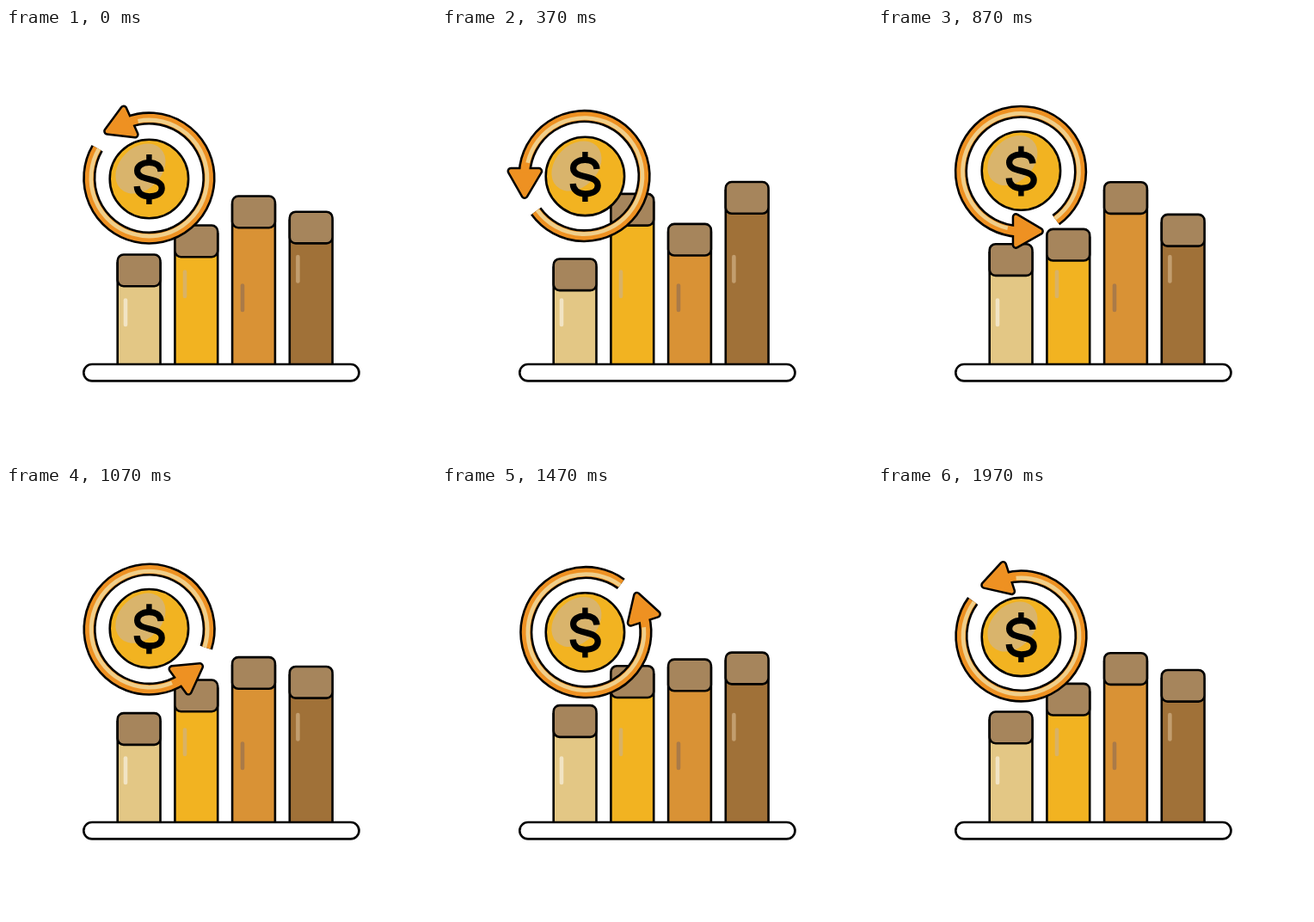
These frames come from a looping animation (500 px wide and 500 px high, 2000 ms). An HTML page:

```html
<!DOCTYPE html>
<html lang="en">
<head>
<meta charset="utf-8">
<title>Growing bars and a circling coin</title>
<style>
  html, body { margin: 0; width: 100%; height: 100%; overflow: hidden; background: #fff; }
  svg { display: block; width: 100%; height: 100%; }
</style>
</head>
<body>
<svg id="stage" viewBox="0 0 500 500" fill="none"></svg>
<script>
const LOOP = 2000, FRAMES = 60, BASE_Y = 391, BAR_WIDTH = 49.8;
const INK = '#000', ORANGE = '#ee9122', CREAM = '#f0cf8b';
const COIN_X = 166.4;

// tops: bar height keys at 0, 1/3 and 2/3 of a one-second cycle
const BARS = [
  { x: 129.7, fill: '#e3c785', shine: '#f1e4c4', shineX: 139, shineY: 316.5, tops: [263.5, 269.6, 228.5] },
  { x: 196.4, fill: '#f2b321', shine: '#d9b265', shineX: 208, shineY: 283.5, tops: [229.5, 191.5, 241.9] },
  { x: 263.1, fill: '#d99235', shine: '#aa7a48', shineX: 275, shineY: 299.5, tops: [195.5, 230.1, 149.2] },
  { x: 329.8, fill: '#a07138', shine: '#c29e6f', shineX: 339.4, shineY: 266, tops: [213.7, 177.8, 222.8] }
];

const stage = document.getElementById('stage');

function add(parent, tag, attrs) {
  const node = document.createElementNS('http://www.w3.org/2000/svg', tag);
  for (const name in attrs) node.setAttribute(name, attrs[name]);
  return parent.appendChild(node);
}

function arc(r, from, to) {
  const point = deg => {
    const a = deg * Math.PI / 180;
    return (r * Math.cos(a) - 0.9).toFixed(2) + ' ' + (r * Math.sin(a) - 0.4).toFixed(2);
  };
  return `M${point(from)}A${r} ${r} 0 1 1 ${point(to)}`;
}

const outline = { stroke: INK, 'stroke-width': 2.6 };

for (const bar of BARS) {
  bar.body = add(stage, 'path', { fill: bar.fill, ...outline });
  bar.cap = add(stage, 'rect', { x: bar.x, width: BAR_WIDTH, height: 36.7, rx: 7, fill: '#a6855c', ...outline });
  add(stage, 'path', {
    d: `M${bar.shineX} ${bar.shineY}v28.5`, stroke: bar.shine, 'stroke-width': 4.6, 'stroke-linecap': 'round'
  });
}
add(stage, 'rect', { x: 90.3, y: BASE_Y, width: 320.2, height: 19.4, rx: 9.7, fill: '#fff', ...outline });

// Ring and arrowhead, drawn around the coin centre with the arrow pointing down
const ring = add(stage, 'g');
const head = 'M-86.2 -6H-53.8L-70.4 21.8Z';
for (const [color, band, edge] of [[INK, 15.2, 9.4], [ORANGE, 10, 4.4]]) {
  add(ring, 'path', { d: arc(69.6, 183, 504), stroke: color, 'stroke-width': band });
  add(ring, 'path', { d: head, fill: color, stroke: color, 'stroke-width': edge, 'stroke-linejoin': 'round' });
}
add(ring, 'path', { d: arc(67.6, 193, 504), stroke: CREAM, 'stroke-width': 4.6 });

const coin = add(stage, 'g');
add(coin, 'circle', { r: 45.7, fill: '#f2b321', ...outline });
add(coin, 'ellipse', { rx: 33, ry: 24.5, transform: 'translate(-10 -12) rotate(-45)', fill: '#d9b46c' });
add(coin, 'path', {
  d: 'M13.6 -8.5C13.2 -15.5 8 -19 0 -19C-8.5 -19 -13.8 -15 -13.8 -9.5C-13.8 -3.5 -8 -1.8 0 .3' +
     'C9 2.5 14.8 4.5 14.8 10.8C14.8 16.8 9 20.3 .3 20.3C-8.5 20.3 -13.8 16 -14.2 8.5',
  stroke: INK, 'stroke-width': 7.2
});
add(coin, 'path', { d: 'M0 -28.5V-19M0 20V29.5', stroke: INK, 'stroke-width': 6.4 });

const ease = u => u * u * (3 - 2 * u);
const mix = (a, b, u) => a + (b - a) * ease(u);

function draw(time) {
  // 30 steps a second, held on a 10 ms grid
  const tick = Math.floor((time % LOOP) / 10);
  const t = Math.floor((tick + 0.5) * 0.3) * LOOP / FRAMES;

  const phase = (t % 1000) / 1000 * 3;
  const key = Math.min(2, Math.floor(phase + 1e-6));
  for (const bar of BARS) {
    const top = mix(bar.tops[key], bar.tops[(key + 1) % 3], phase - key);
    bar.cap.setAttribute('y', top);
    bar.body.setAttribute('d', `M${bar.x} ${BASE_Y}V${top + 10}h${BAR_WIDTH}V${BASE_Y}`);
  }

  const y = mix(175.5, 165.5, t < 1000 ? t / 1000 : 2 - t / 1000);
  coin.setAttribute('transform', `translate(${COIN_X} ${y})`);
  ring.setAttribute('transform', `translate(${COIN_X} ${y}) rotate(${66 - t * 360 / LOOP})`);
}

const start = performance.now();
function loop(now) {
  draw(Math.max(0, now - start));
  requestAnimationFrame(loop);
}
draw(0);
requestAnimationFrame(loop);
</script>
</body>
</html>
```
